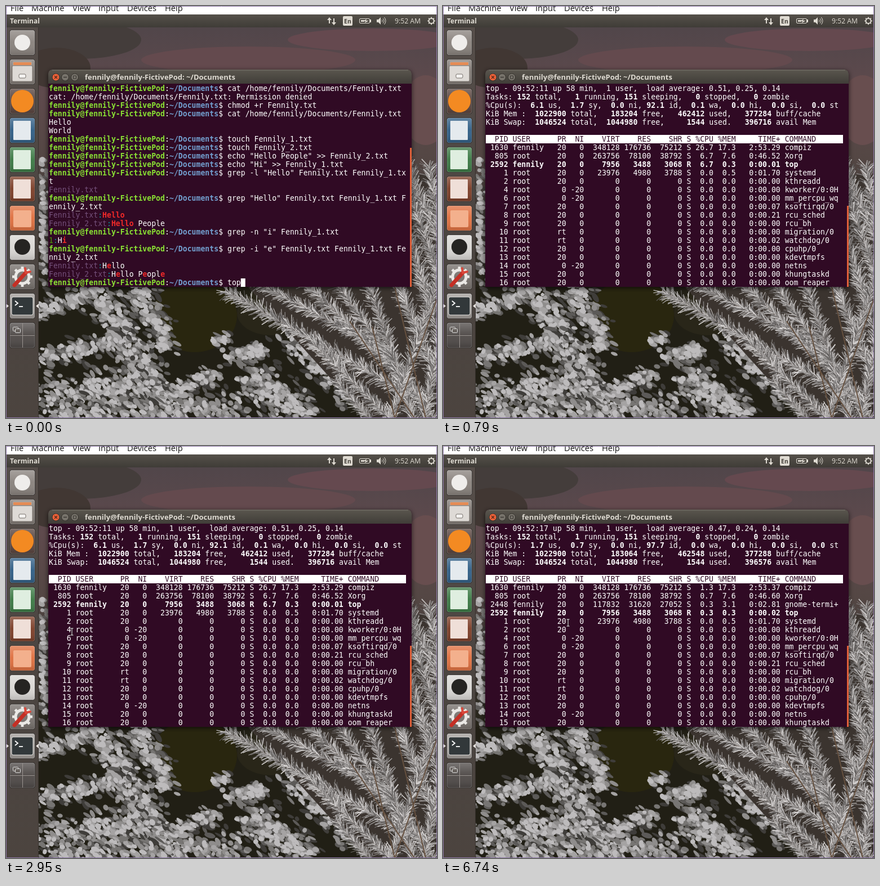
These frames come from a looping animation (765 by 732 pixels, 8000 ms). An HTML page with a canvas:

```html
<!DOCTYPE html>
<html lang="en">
<head>
<meta charset="utf-8">
<title>Terminal running top</title>
<style>
  html, body { margin: 0; width: 100%; height: 100%; overflow: hidden; background: #222; }
  canvas { display: block; }
</style>
</head>
<body>
<canvas id="stage" width="765" height="732"></canvas>
<script>
const LOOP = 8000, WIDTH = 765, HEIGHT = 732;
const COL = 7.925, ROW = 15, LEFT = 76, TOP = 139;
const MONO = '13.163px "DejaVu Sans Mono", monospace';
const SANS = '"Open Sans", sans-serif';
const screen = document.getElementById('stage').getContext('2d');
const desktop = document.createElement('canvas');
desktop.width = WIDTH;
desktop.height = HEIGHT;
let g = desktop.getContext('2d');

// ---------- drawing helpers ----------
let seed = 7;
function rand(a = 0, b = 1) {
  seed = (seed * 1664525 + 1013904223) >>> 0;
  return a + (b - a) * seed / 4294967296;
}
function rect(x, y, w, h, fill) { g.fillStyle = fill; g.fillRect(x, y, w, h); }
function box(x, y, w, h, r, fill, line) {
  g.beginPath();
  g.roundRect(x, y, w, h, r);
  if (fill) { g.fillStyle = fill; g.fill(); }
  if (line) { g.strokeStyle = line; g.lineWidth = 1; g.stroke(); }
}
function oval(x, y, rx, ry, fill, angle = 0) {
  g.beginPath();
  g.ellipse(x, y, rx, ry, angle, 0, 7);
  g.fillStyle = fill;
  g.fill();
}
function poly(points, fill) {
  g.beginPath();
  points.forEach(p => g.lineTo(...p));
  g.fillStyle = fill;
  g.fill();
}
function line(points, color, width = 1) {
  g.beginPath();
  points.forEach(p => g.lineTo(...p));
  g.strokeStyle = color;
  g.lineWidth = width;
  g.stroke();
}
function shade(y0, y1, ...colors) {
  const s = g.createLinearGradient(0, y0, 0, y1);
  colors.forEach((c, i) => s.addColorStop(i / (colors.length - 1), c));
  return s;
}
function label(str, x, y, font, color) {
  g.font = font;
  g.fillStyle = color;
  g.fillText(str, x, y);
}

// ---------- wallpaper ----------
const GREYS = ['#3f3d3a', '#5c5a58', '#777573', '#8f8d8c', '#a5a3a3', '#bdbbbc'];

function softPlume(x0, y0, x1, y1, spread, count) {
  for (let i = 0; i < count; i++) {
    const k = i / count, t = rand(), w = spread * (1.25 - 0.6 * k);
    const x = x0 + (x1 - x0) * t + w * (rand(-1, 1) + rand(-1, 1)) / 1.5;
    const y = y0 + (y1 - y0) * t + w * (rand(-1, 1) + rand(-1, 1)) / 1.5;
    oval(x, y, rand(4, 11) * (1.1 - k / 2), rand(2, 5), GREYS[Math.floor(k * 6)], rand(0.1, 1.1));
  }
}

function sharpPlume(x0, y0, x1, y1, hair) {
  const length = Math.hypot(x1 - x0, y1 - y0), dir = Math.atan2(y1 - y0, x1 - x0);
  line([[x0, y0], [x1, y1]], '#5b483d', 2);
  for (let d = 0; d < length; d += 2.2) {
    const x = x0 + Math.cos(dir) * d, y = y0 + Math.sin(dir) * d;
    for (const side of [-1, 1, -1, 1]) {
      const a = dir + Math.PI + side * rand(0.25, 1.25), r = rand(0.35, 1) * hair;
      const tone = rand(85, 225);
      line([[x, y], [x + Math.cos(a) * r, y + Math.sin(a) * r]],
        `rgb(${tone},${tone - 3},${tone - 4})`, rand(0.7, 1.7));
    }
  }
}

function wallpaper() {
  g.save();
  g.beginPath();
  g.rect(58, 38, 707, 694);
  g.clip();
  rect(58, 38, 707, 694, shade(38, 500, '#51464a', '#5f4a4d', '#544744', '#3d3834', '#252318'));
  oval(130, 60, 110, 34, '#443d3b');
  oval(90, 110, 60, 36, '#413733');
  oval(430, 96, 190, 24, '#644a4e');
  oval(650, 60, 150, 20, '#65494f');
  oval(745, 185, 42, 62, '#684e4f');
  rect(58, 499, 707, 233, '#211f15');
  oval(335, 550, 75, 65, '#29260f');
  oval(470, 545, 60, 40, '#292619');
  [[64, 270, 70, 500, 9, 120], [58, 545, 150, 510, 16, 130], [155, 495, 300, 735, 30, 620],
   [235, 500, 285, 610, 24, 200], [58, 625, 210, 590, 18, 190], [58, 700, 260, 670, 36, 420],
   [70, 735, 420, 715, 28, 420], [290, 690, 370, 655, 16, 130], [370, 592, 395, 590, 9, 30],
   [400, 625, 460, 610, 16, 90], [430, 660, 540, 735, 32, 330], [500, 590, 610, 690, 25, 210]
  ].forEach(p => softPlume(...p));
  poly([[430, 500], [720, 300], [765, 300], [765, 732], [640, 732]], '#3b342f');
  [[705, 275, 800, 480, 24], [715, 330, 790, 540, 24], [712, 400, 780, 620, 24],
   [750, 285, 770, 400, 20], [390, 506, 715, 690, 24], [450, 494, 690, 620, 20],
   [530, 490, 745, 700, 22], [585, 490, 760, 735, 22], [545, 600, 690, 740, 22],
   [640, 480, 725, 740, 24], [690, 480, 765, 660, 24], [770, 480, 680, 740, 22],
   [775, 570, 740, 740, 22], [585, 665, 650, 740, 20]
  ].forEach(p => sharpPlume(...p));
  [[610, 560, 725, 732], [690, 500, 745, 732], [765, 520, 690, 732], [650, 570, 690, 732]]
    .forEach(([a, b, c, d]) => line([[a, b], [c, d]], '#65503f', 2));
  g.restore();
}

// ---------- menu, panel, launcher ----------
function bars() {
  rect(0, 0, WIDTH, 15, '#fff');
  [['File', 8], ['Machine', 45], ['View', 118], ['Input', 164], ['Devices', 215], ['Help', 282]]
    .forEach(([name, x]) => label(name, x, 9, '14.7px ' + SANS, '#111'));
  rect(0, 15, WIDTH, 23, shade(15, 38, '#55514a', '#3f3c37'));
  const ink = '#dfdbd2';
  label('Terminal', 7, 31, 'bold 12px ' + SANS, ink);
  label('9:52 AM', 690, 31, '12.2px ' + SANS, ink);
  rect(573, 23, 2, 8, ink);
  poly([[570, 25], [574, 20], [578, 25]], ink);
  rect(581, 22, 2, 8, ink);
  poly([[578, 29], [582, 34], [586, 29]], ink);
  box(598, 18, 17, 17, 2, ink);
  label('En', 600, 30.5, 'bold 10.5px ' + SANS, '#45413b');
  box(627.5, 22.5, 18, 8, 1.5, null, ink);
  rect(646, 24, 2, 5, ink);
  rect(630, 25, 6, 3, ink);
  poly([[634, 27], [640, 23], [639, 26], [644, 26], [637, 30], [638, 27]], ink);
  poly([[658, 24], [661, 24], [665, 20], [665, 33], [661, 29], [658, 29]], ink);
  for (const r of [3, 6, 9]) {
    g.beginPath();
    g.arc(665, 26.5, r, -0.8, 0.8);
    g.stroke();
  }
  gear(755, 26.5, 4.5, ink);
}

function gear(x, y, r, color) {
  g.beginPath();
  g.arc(x, y, r, 0, 7);
  g.strokeStyle = color;
  g.lineWidth = r * 0.42;
  g.stroke();
  for (let i = 0; i < 8; i++) {
    const a = i * Math.PI / 4, c = Math.cos(a), s = Math.sin(a);
    line([[x + c * r, y + s * r], [x + c * r * 1.5, y + s * r * 1.5]], color, r * 0.4);
  }
}

function launcher() {
  rect(0, 38, 58, 694, shade(38, 732, '#564e4a', '#4b4541', '#4c443f'));
  rect(57, 38, 1, 694, '#38322e');
  const tiles = ['#8a837e', '#817a75', '#59443e', '#315f86', '#3c7a45', '#7d3f29',
    '#df7040', '#d9d7d4', '#77716d', '#a09b97', '#4f4a48'];
  tiles.forEach((color, i) => {
    const y = 42 + 52 * i;
    box(6.5, y + 0.5, 45, 45, 4, color, '#24201e');
    box(7, y + 1, 44, 44, 4, shade(y, y + 45, '#ffffff40', '#ffffff08', '#00000026'), '#ffffff40');
  });
  oval(29, 65, 14, 14, '#efedeb');
  box(12, 98, 34, 12, 2, '#aca5a0');
  box(13, 100, 32, 5, 1, '#e58c55');
  box(11, 106, 36, 28, 2, '#dedad6', '#77706b');
  box(23, 121, 12, 7, 2, '#f5f3f1', '#77706b');
  oval(29, 169, 20, 20, '#f38a22');
  box(13, 204, 31, 34, 1, '#e5eaee');
  box(13, 256, 31, 34, 1, '#dfeee0');
  box(13, 308, 31, 34, 1, '#efdfd8');
  box(13, 363, 32, 30, 2, '#f3b08d');
  oval(29, 428, 14, 14, '#252422');
  gear(29, 481, 12, '#eae8e5');
  g.lineCap = 'round';
  line([[15, 496], [35, 474]], '#c42f25', 7);
  line([[35, 474], [34, 466]], '#d8483b', 4);
  line([[35, 474], [43, 472]], '#d8483b', 4);
  g.lineCap = 'butt';
  box(10, 517, 38, 32, 3, '#32383a', '#e7e5e2');
  line([[16, 524], [21, 528], [16, 532]], '#fff', 1.8);
  line([[23, 534], [30, 534]], '#fff', 1.8);
  poly([[0, 529], [5, 533], [0, 537]], '#e7e3df');
  poly([[58, 529], [53, 533], [58, 537]], '#e7e3df');
  line([[29.5, 563], [29.5, 607]], '#99938f');
  line([[7, 585.5], [51, 585.5]], '#99938f');
  box(12.5, 570.5, 9, 7, 1, '#67615d', '#ddd');
  box(16.5, 573.5, 9, 7, 1, '#67615d', '#ddd');
}

function windowFrame() {
  g.shadowColor = '#000a';
  g.shadowBlur = 9;
  g.shadowOffsetY = 2;
  box(75, 113, 645, 386, [7, 7, 0, 0], '#300a24');
  g.shadowColor = 'transparent';
  box(75, 113, 645, 25, [7, 7, 0, 0], shade(113, 138, '#5a564e', '#403d38'));
  line([[82, 114], [714, 114]], '#77726a');
  for (const x of [88.5, 105, 122]) {
    oval(x, 126.5, 6.8, 6.8, '#302d29');
    oval(x, 126.5, 6, 6, x < 90 ? '#ee6239' : '#77736b');
  }
  line([[86, 124], [91, 129]], '#56281b', 1.4);
  line([[91, 124], [86, 129]], '#56281b', 1.4);
  line([[102, 126.5], [108, 126.5]], '#35322e', 1.4);
  box(119.5, 124, 5, 5, 0, null, '#35322e');
  label('fennily@fennily-FictivePod: ~/Documents', 140, 131, 'bold 13px ' + SANS, '#dfdbd2');
}

// ---------- terminal text; {style:text} marks a coloured run ----------
const STYLES = {
  g: ['bold ', '#8ae234'], p: ['bold ', '#729fcf'], r: ['bold ', '#ef2929'], b: ['bold ', '#fff'],
  m: ['', '#75507b'], t: ['', '#06989a'], n: ['', '#4e9a06'], k: ['', '#300a24']
};

function textRow(str, row) {
  let col = 0;
  for (const [run, style, inner] of str.matchAll(/\{(\w):(.*?)\}|[^{]+/g)) {
    const [weight, color] = STYLES[style] || ['', '#fff'], text = inner ?? run;
    label(text, LEFT + col * COL, TOP + row * ROW + 12, weight + MONO, color);
    col += text.length;
  }
}

const PROMPT = '{g:fennily@fennily-FictivePod}:{p:~/Documents}$ ';
const run = cmd => [PROMPT + cmd.slice(0, 40), ...(cmd.length > 40 ? [cmd.slice(40)] : [])];
const found = (file, text) => `{m:${file}}{t::}${text}`;
const history = [
  run('cat /home/fennily/Documents/Fennily.txt'),
  'cat: /home/fennily/Documents/Fennily.txt: Permission denied',
  run('chmod +r Fennily.txt'),
  run('cat /home/fennily/Documents/Fennily.txt'),
  'Hello', 'World',
  run('touch Fennily_1.txt'),
  run('touch Fennily_2.txt'),
  run('echo "Hello People" >> Fennily_2.txt'),
  run('echo "Hi" >> Fennily_1.txt'),
  run('grep -l "Hello" Fennily.txt Fennily_1.txt'),
  '{m:Fennily.txt}',
  run('grep "Hello" Fennily.txt Fennily_1.txt Fennily_2.txt'),
  found('Fennily.txt', '{r:Hello}'),
  found('Fennily_2.txt', '{r:Hello} People'),
  run('grep -n "i" Fennily_1.txt'),
  '{n:1}{t::}H{r:i}',
  run('grep -i "e" Fennily.txt Fennily_1.txt Fennily_2.txt'),
  found('Fennily.txt', 'H{r:e}llo'),
  found('Fennily_2.txt', 'H{r:e}llo P{r:e}opl{r:e}'),
  run('top')
].flat();

const HEADER = '{k:  PID USER      PR  NI    VIRT    RES    SHR S %CPU %MEM     TIME+ COMMAND}';
const FIELDS = [5, -10, 2, 4, 8, 7, 7, 2, 5, 5, 10];

// A leading * marks the running process, shown in bold.
function processRow(entry) {
  const cells = entry.replace('*', '').split(' ');
  const text = FIELDS.map((w, i) => w < 0 ? ' ' + cells[i].padEnd(-w - 1) + ' ' : cells[i].padStart(w))
    .join('') + ' ' + cells[11];
  return entry[0] === '*' ? `{b:${text}}` : text;
}
const kernel = (pid, name, time = '0:00.00', sched = '20 0') =>
  `${pid} root ${sched} 0 0 0 S 0.0 0.0 ${time} ${name}`;
const IDLE = [
  '1 root 20 0 23976 4980 3788 S 0.0 0.5 0:01.70 systemd',
  kernel(2, 'kthreadd'),
  kernel(4, 'kworker/0:0H', '0:00.00', '0 -20'),
  kernel(6, 'mm_percpu_wq', '0:00.00', '0 -20'),
  kernel(7, 'ksoftirqd/0', '0:00.07'),
  kernel(8, 'rcu_sched', '0:00.21'),
  kernel(9, 'rcu_bh'),
  kernel(10, 'migration/0', '0:00.00', 'rt 0'),
  kernel(11, 'watchdog/0', '0:00.02', 'rt 0'),
  kernel(12, 'cpuhp/0'),
  kernel(13, 'kdevtmpfs'),
  kernel(14, 'netns', '0:00.00', '0 -20'),
  kernel(15, 'khungtaskd'),
  kernel(16, 'oom_reaper')
];

function topScreen(clock, load, tasks, [us, sy, id, wa], [free, used, cache, avail], busy) {
  const summary = [
    `Tasks: 152 total,   ${tasks[0]} running, ${tasks[1]} sleeping,   0 stopped,   0 zombie`,
    `%Cpu(s):  ${us} us,  ${sy} sy,  0.0 ni, ${id} id,  ${wa} wa,  0.0 hi,  0.0 si,  0.0 st`,
    `KiB Mem :  1022900 total,   ${free} free,   ${used} used,   ${cache} buff/cache`,
    `KiB Swap:  1046524 total,  1044980 free,     1544 used.   ${avail} avail Mem`
  ].map(s => s.replace(/\d[\d.]*/g, n => n === '1544' ? `{b:${n}}` : `{b:${n}}`));
  return [`top - 09:52:${clock} up 58 min,  1 user,  load average: ${load}, 0.14`,
    ...summary, '', HEADER, ...busy.concat(IDLE).map(processRow)].slice(0, 24);
}

const user = (pid, mem, usage, name) => `${pid} fennily 20 0 ${mem} ${usage} ${name}`;
const compiz = (cpu, time) => user(1630, '348128 176736 75212', `S ${cpu} 17.3 ${time}`, 'compiz');
const xorg = usage => `805 root 20 0 263756 78100 38792 ${usage} Xorg`;
const gnome = (cpu, time) => user(2448, '117832 31620 27052', `S ${cpu} 3.1 ${time}`, 'gnome-termi+');
const topRow = usage => '*' + user(2592, '7956 3488 3068', usage, 'top');

const scenes = [
  { at: 0, rows: history.slice(0, 24), bar: 252, caret: [43, 23] },
  { at: 420, rows: history.slice(1), bar: 259, caret: [0, 23] },
  { at: 540, rows: history.slice(1), bar: 259 },
  { at: 790, bar: 355, rows: topScreen(11, '0.51, 0.25', [1, 151], ['6.1', '1.7', '92.1', '0.1'],
    [183204, 462412, 377284, 396716],
    [compiz('26.7', '2:53.29'), xorg('S 6.7 7.6 0:46.52'), topRow('R 6.7 0.3 0:00.01')]) },
  { at: 3790, bar: 355, rows: topScreen(14, '0.47, 0.24', [2, 150], ['4.0', '1.3', '94.6', '0.0'],
    [182996, 462596, 377308, 396508],
    ['*' + xorg('R 2.0 7.6 0:46.58'), gnome('2.0', '0:02.80'), compiz('1.3', '2:53.33'),
      user(1462, '30308 7204 6772', 'S 0.3 0.7 0:03.01', 'ibus-engine+')]) },
  { at: 6740, bar: 355, rows: topScreen(17, '0.47, 0.24', [1, 151], ['1.7', '0.7', '97.7', '0.0'],
    [183064, 462548, 377288, 396576],
    [compiz('1.3', '2:53.37'), xorg('S 0.7 7.6 0:46.60'), gnome('0.3', '0:02.81'),
      topRow('R 0.3 0.3 0:00.02')]) }
];

// Pointer jumps: time, x, y
const pointer = [[2410, 384, 481], [2560, 272, 405], [2690, 150, 342], [2810, 114, 329],
  [2950, 117, 330], [3070, 93, 284], [3650, 202, 312], [3790, 222, 314]];

function ibeam(x, y) {
  for (const [color, width] of [['#180512', 2.6], ['#fff', 1]]) {
    line([[x - 2.5, y - 6], [x + 2.5, y - 6]], color, width);
    line([[x - 2.5, y + 6], [x + 2.5, y + 6]], color, width);
    line([[x, y - 6], [x, y + 6]], color, width);
  }
}

function render(time) {
  const { rows, bar, caret } = scenes.findLast(s => s.at <= time);
  g.drawImage(desktop, 0, 0);
  if (rows.includes(HEADER)) rect(LEFT, TOP + 6 * ROW, 80 * COL, ROW, '#fff');
  rows.forEach(textRow);
  if (caret) rect(LEFT + caret[0] * COL, TOP + caret[1] * ROW, 8, ROW, '#fff');
  rect(717, bar, 3, 499 - bar, '#e0613a');
  const spot = pointer.findLast(p => p[0] <= time);
  if (spot) ibeam(spot[1], spot[2]);
}

wallpaper();
bars();
launcher();
windowFrame();
box(0.5, 0.5, WIDTH - 1, HEIGHT - 1, 0, null, '#8e78a8');
g = screen;

const start = performance.now();
function tick() {
  render((performance.now() - start) % LOOP);
  requestAnimationFrame(tick);
}
tick();
</script>
</body>
</html>
```
